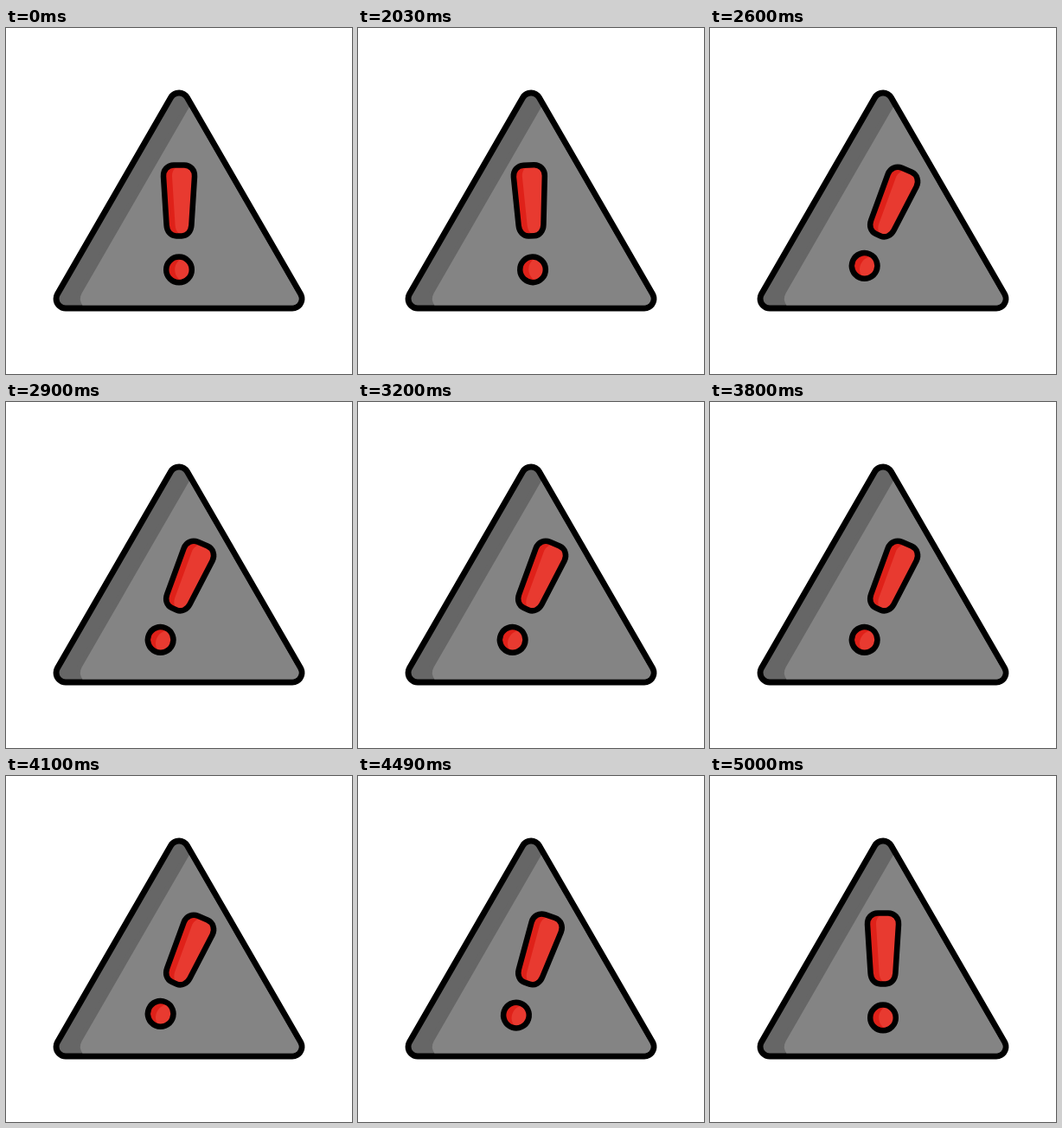
Recreate the animation shown at these times as an HTML page. Size 400 px wide and 400 px high, loop 5.03 s.

```html
<!DOCTYPE html>
<html lang="en">
<head>
<meta charset="utf-8">
<title>Warning sign</title>
<style>
  html, body { margin: 0; width: 100%; height: 100%; overflow: hidden; background: #fff; }
  svg { display: block; width: 100vw; height: 100vh; }
  .sign { stroke-linejoin: round; }
</style>
</head>
<body>
<svg viewBox="0 0 400 400">
  <defs>
    <path id="tri" d="M69 313 200 86 331 313Z"/>
    <path id="shape" d="M194 158.4H206C213.2 158.4 218.4 164.4 218 171.5L214.4 228C214 235 209.5 240.4 203 240.4H197C190.5 240.4 186 235 185.6 228L182 171.5C181.6 164.4 186.8 158.4 194 158.4Z
      M185.2 279.4A14.8 14.8 0 0 1 214.8 279.4A14.8 14.8 0 0 1 185.2 279.4Z"/>
    <clipPath id="inside"><use href="#shape"/></clipPath>
  </defs>

  <g class="sign">
    <use href="#tri" fill="#000" stroke="#000" stroke-width="28.8"/>
    <use href="#tri" fill="#666" stroke="#666" stroke-width="15"/>
    <path fill="#848484" d="M211.8 91.4 337.5 309.2A7.5 7.5 0 0 1 331 320.5H88.4A13 13 0 0 1 87.7 306.5Z"/>
  </g>

  <g id="mark">
    <use href="#shape" fill="#df2119"/>
    <g clip-path="url(#inside)"><use href="#shape" x="10" fill="#e83a30"/></g>
    <use href="#shape" fill="none" stroke="#000" stroke-width="6.5"/>
  </g>
</svg>
<script>
  const LOOP = 5030, HOLD = 2000, STEP = 30;
  const FIRST = 6, SWING = 5, LAST = 71, END = 100, MAX = 30;
  const mark = document.getElementById('mark');
  const start = performance.now();

  const ease = p => p * p * (3 - 2 * p);
  const mix = (a, b, p) => a + (b - a) * ease(p);

  // Ease into the swing, rock side to side, then settle slowly upright.
  function angle(step) {
    if (step < FIRST) return mix(0, -MAX, step / FIRST);
    if (step >= LAST) return mix(MAX, 0, (step - LAST) / (END - LAST));
    const swing = (step - FIRST) / SWING;
    const n = Math.floor(swing);
    const from = n % 2 ? MAX : -MAX;
    return mix(from, -from, swing - n);
  }

  function draw() {
    const t = (performance.now() - start) % LOOP;
    const step = Math.min(END, Math.max(0, Math.floor((t - HOLD) / STEP)));
    mark.setAttribute('transform', `rotate(${angle(step).toFixed(3)} 200 226.5)`);
    requestAnimationFrame(draw);
  }
  draw();
</script>
</body>
</html>
```
